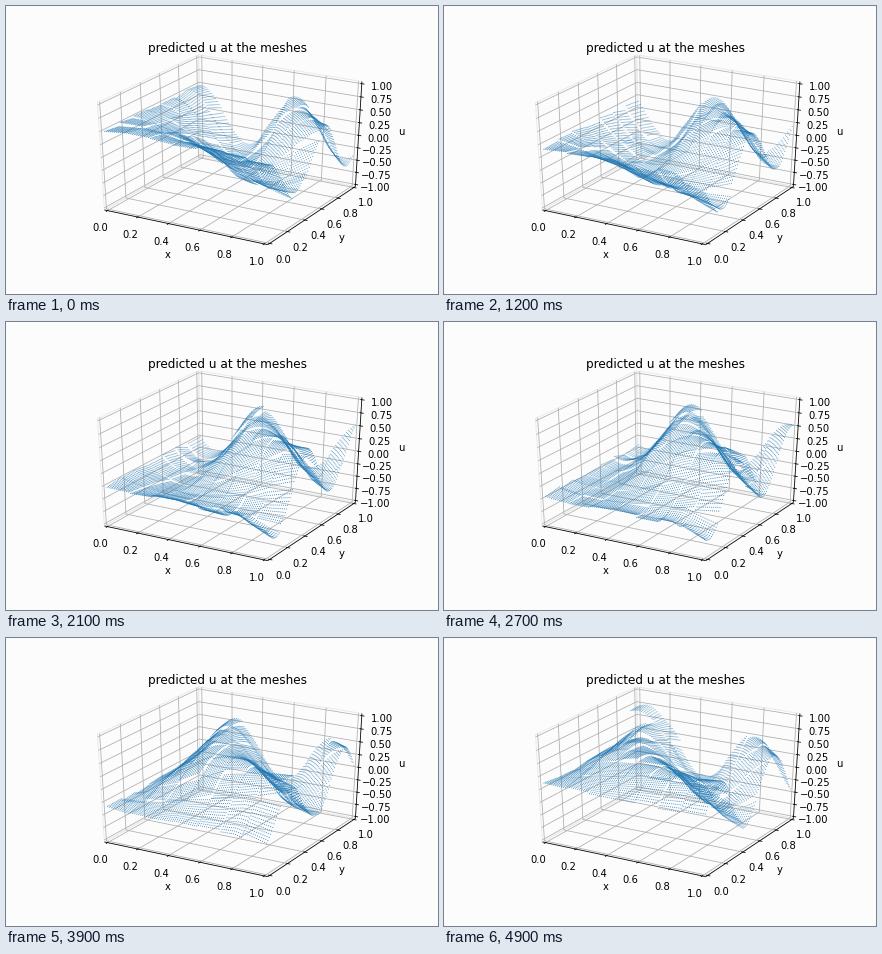
These frames come from a looping animation (432 by 288 pixels, 5 s). A matplotlib script:

```python
import numpy as np
import matplotlib.pyplot as plt
from matplotlib.animation import FuncAnimation
from matplotlib.collections import LineCollection

plt.rcParams["font.family"] = "DejaVu Sans"

FRAMES, INTERVAL = 50, 100
BACK = "#fcfcfc"
BLUE = (0x1F / 255, 0x77 / 255, 0xB4 / 255)
DELTA = 1 / 12
LOW, HIGH = -DELTA / 4, 1 + DELTA / 4

# Perspective camera looking at the centre of the unit box.
AZIM, ELEV, DIST = np.radians(-60), np.radians(30), 10
ca, sa, ce, se = np.cos(AZIM), np.sin(AZIM), np.cos(ELEV), np.sin(ELEV)
RIGHT = np.array([-sa, ca, 0])
UP = np.array([-ca * se, -sa * se, ce])
TOWARD = np.array([ca * ce, sa * ce, se])


def project(points):
    """Return screen positions and distances from the eye."""
    c = np.asarray(points, float) - 0.5
    w = DIST - c @ TOWARD
    return np.stack([c @ RIGHT / w, c @ UP / w], axis=-1), w


fig = plt.figure(figsize=(6, 4), dpi=72, facecolor=BACK)
ax = fig.add_axes([0.125, 0.125, 0.775, 0.755])
ax.set_xlim(-0.095, 0.09)
ax.set_ylim(-0.095, 0.09)
ax.axis("off")


def draw_lines(paths, color, width, zorder):
    ax.add_collection(
        LineCollection([project(p)[0] for p in paths], colors=color,
                       linewidths=width, zorder=zorder, clip_on=False),
        autolim=False)


def put_text(point, text, va):
    x, y = project(point)[0]
    ax.text(x, y, text, ha="center", va=va, fontsize=10)


def move_out(point, distance, axis):
    """Push a point away from the box centre, except along its axis."""
    shift = np.where(point > 0.5, distance, -distance)
    shift[axis] = 0
    return point + shift


def draw_axis(axis, corner, tick_axis, tick_sign, values, labels, name):
    corner = np.array(corner, float)
    inner = np.array([LOW, HIGH, LOW])
    flip = LOW + HIGH - inner
    per_point = 48 / (334.8 + 217.44) * DELTA

    ends = np.array([corner, corner])
    ends[:, axis] = LOW, HIGH
    grid, ticks = [], []
    for value, label in zip(values, labels):
        path = np.array([inner, inner, inner])
        path[0, (axis + 1) % 3] = flip[(axis + 1) % 3]
        path[2, (axis + 2) % 3] = flip[(axis + 2) % 3]
        path[:, axis] = value
        grid.append(path)

        spot = corner.copy()
        spot[axis] = value
        tick = np.array([spot, spot])
        tick[:, tick_axis] += np.array([0.1, -0.2]) * tick_sign * DELTA
        ticks.append(tick)
        put_text(move_out(spot, 11.5 * per_point, axis), label, "top")

    draw_lines(grid, "#b0b0b0", 0.8, 1)
    draw_lines([ends], "black", 0.8, 2)
    draw_lines(ticks, "black", 0.8, 2)
    put_text(move_out(ends.mean(axis=0), 25 * per_point, axis), name, "center")


def draw_box():
    lo, hi = LOW, HIGH
    panes = [
        [(lo, lo, lo), (lo, hi, lo), (lo, hi, hi), (lo, lo, hi), (lo, lo, lo)],
        [(lo, hi, lo), (hi, hi, lo), (hi, hi, hi), (lo, hi, hi), (lo, hi, lo)],
        [(lo, lo, lo), (hi, lo, lo), (hi, hi, lo), (lo, hi, lo), (lo, lo, lo)],
    ]
    draw_lines(panes, "#ebebeb", 1, 0)
    unit = np.linspace(0, 1, 6)
    unit_labels = [f"{v:.1f}" for v in unit]
    heights = np.linspace(-1, 1, 9)
    height_labels = [f"{v:.2f}".replace("-", "\u2212") for v in heights]
    draw_axis(0, (0, lo, lo), 1, 1, unit, unit_labels, "x")
    draw_axis(1, (hi, 0, lo), 0, -1, unit, unit_labels, "y")
    draw_axis(2, (hi, hi, 0), 0, -1, (heights + 1) / 2, height_labels, "u")


draw_box()
ax.text(0.5, 0.92 + 6 / 217.44, "predicted u at the meshes", fontsize=12,
        ha="center", va="baseline", transform=ax.transAxes)

N, CELLS = 80, 7
X, Y = (a.ravel() for a in np.meshgrid(np.linspace(0, 1, N),
                                       np.linspace(0, 1, N)))

# Each patch of the mesh is a little off, most of all near the far edges.
rng = np.random.default_rng(7)
col, row = (np.minimum((v * CELLS).astype(int), CELLS - 1) for v in (X, Y))
local_x, local_y = X * CELLS - col - 0.5, Y * CELLS - row - 0.5


def patch_error():
    offset, tilt_x, tilt_y = rng.normal(0, 1, (3, CELLS, CELLS))[:, col, row]
    weight = 0.025 + 0.05 * (X ** 4 + Y ** 4) / 2
    return weight * (offset + tilt_x * local_x + tilt_y * local_y)


error_cos, error_sin = patch_error(), patch_error()
back_left = np.clip(1 - X / 0.17, 0, 1) * (Y > 0.9)
front_right = np.clip((X - 0.8) / 0.2, 0, 1) * (Y < 0.14)


def wave(t):
    u = 0.5 * np.cos(t + 10 * X * Y)
    u += error_cos * np.cos(t) + error_sin * np.sin(t)
    u += 0.65 * back_left * (t / 5) ** 6
    return u - 0.25 * front_right * np.sin(np.pi * t / 5)


dots = ax.scatter(X, Y, s=1.0, color=BLUE, linewidths=0, zorder=3,
                  clip_on=False)
colors = np.tile((*BLUE, 1.0), (N * N, 1))


def update(frame):
    u = wave(frame * INTERVAL / 1000)
    spots, depth = project(np.column_stack([X, Y, (u + 1) / 2]))
    colors[:, 3] = 1 - 0.5 * (depth - depth.min()) / np.ptp(depth)
    dots.set_offsets(spots)
    dots.set_facecolors(colors)
    return (dots,)


anim = FuncAnimation(fig, update, frames=FRAMES, interval=INTERVAL,
                     repeat=True, repeat_delay=0)
plt.show()
```
